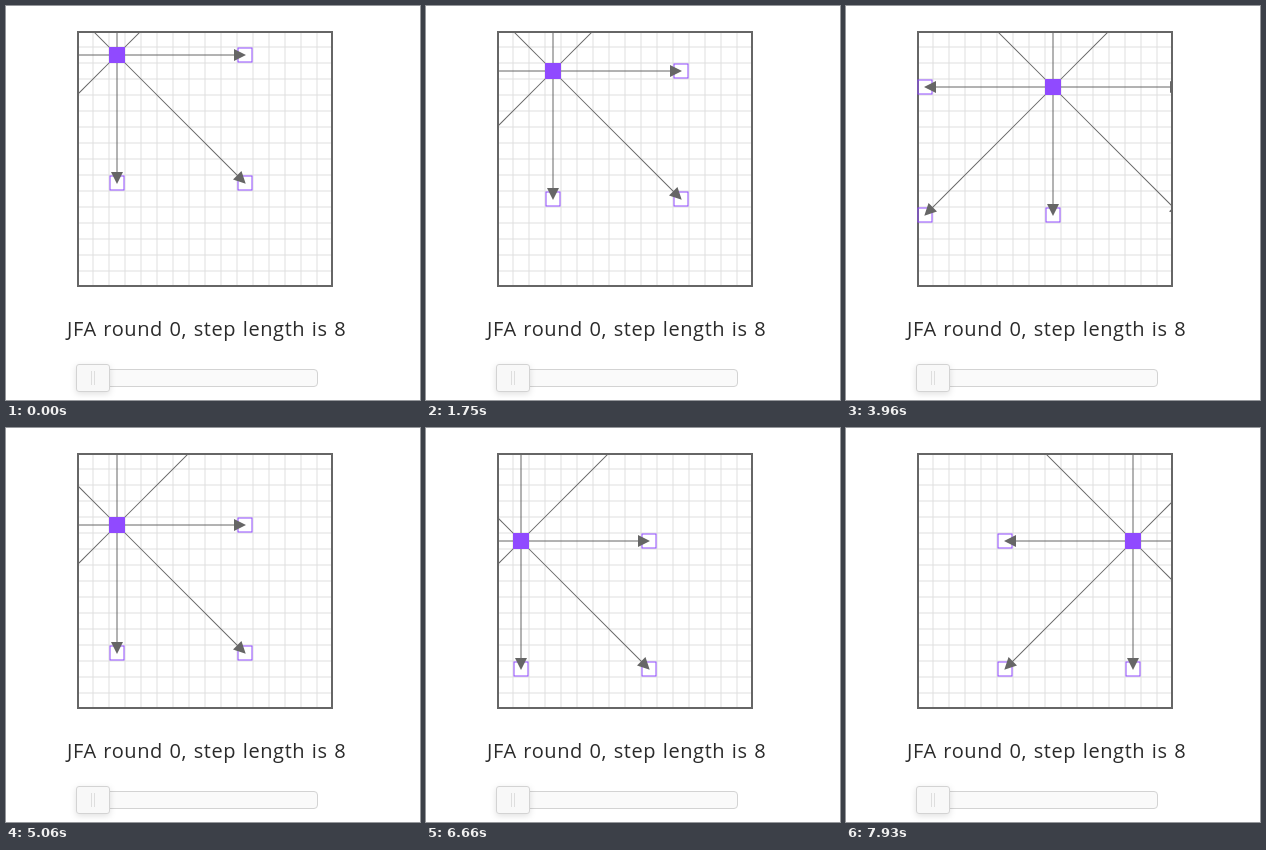
Recreate the animation shown at these times as an HTML page. Size 414x394 px, loop 8000 ms.

```html
<!DOCTYPE html>
<html lang="en">
<head>
<meta charset="utf-8">
<title>Jump flooding</title>
<style>
  html, body { margin: 0; width: 100%; height: 100%; overflow: hidden; background: #fff; }
  svg { display: block; }
  text { font: 20px "Open Sans", "Noto Sans", sans-serif; letter-spacing: .6px; word-spacing: .8px; fill: #2b2b2b; }
  .handle { filter: drop-shadow(0 2px 3px rgba(0, 0, 0, .12)); }
</style>
</head>
<body>
<svg width="414" height="394">
  <svg x="71" y="25" width="256" height="256" overflow="hidden">
    <path id="grid" stroke="#dfdfdf" fill="none"/>
    <rect x="1" y="1" width="254" height="254" fill="none" stroke="#666" stroke-width="2"/>
    <g id="star"></g>
  </svg>
  <text x="61" y="330">JFA round 0, step length is 8</text>
  <g stroke="#d3d3d3">
    <rect x="70.5" y="363.5" width="241" height="17" rx="3.5" fill="#fafafa"/>
    <rect class="handle" x="70.5" y="358.5" width="33" height="27" rx="2.5" fill="#f8f8f8"/>
    <path d="M85.5 365V379M88.5 365V379" stroke="#dedede"/>
  </g>
</svg>
<script>
const CELL = 16, COLS = 16, REACH = 8 * CELL, LOOP = 8000;
const FIRST = 18, STEPS = 75;
const SHORT_TICKS = [1, 28, 36, 44, 52, 60, 100];
const star = document.getElementById('star');

let lines = '';
for (let i = 1; i < COLS; i++) lines += `M${i * CELL} 0V256M0 ${i * CELL}H256`;
document.getElementById('grid').setAttribute('d', lines);

// Targets and arrows around the current cell, centred on 0,0
let targets = '', arrows = '';
for (let a = 0; a < 360; a += 45) {
  const x = Math.round(Math.cos(a * Math.PI / 180)) * REACH;
  const y = Math.round(Math.sin(a * Math.PI / 180)) * REACH;
  const len = Math.hypot(x, y);
  targets += `<rect x="${x - 7}" y="${y - 7}" width="14" height="14" fill="none" stroke="#904aff"/>`;
  arrows += `<g transform="rotate(${a})"><path d="M0 0H${len - 8}" stroke="#666"/>` +
    `<path d="M${len + 1} 0l-12 -6v12z" fill="#666"/></g>`;
}
star.innerHTML = targets + arrows + '<rect x="-8" y="-8" width="16" height="16" fill="#904aff"/>';

// Ticks last 80 ms, a few 70 ms; three steps take four ticks
const tickTime = k => 80 * k - 10 * SHORT_TICKS.filter(s => s <= k).length;
const stepTimes = Array.from({ length: STEPS }, (_, i) => tickTime(Math.floor(4 * (i + 1) / 3)));

function draw() {
  const t = performance.now() % LOOP;
  const cell = FIRST + stepTimes.filter(s => s <= t).length;
  const x = (cell % COLS + .5) * CELL, y = (Math.floor(cell / COLS) + .5) * CELL;
  star.setAttribute('transform', `translate(${x} ${y})`);
  requestAnimationFrame(draw);
}
draw();
</script>
</body>
</html>
```
